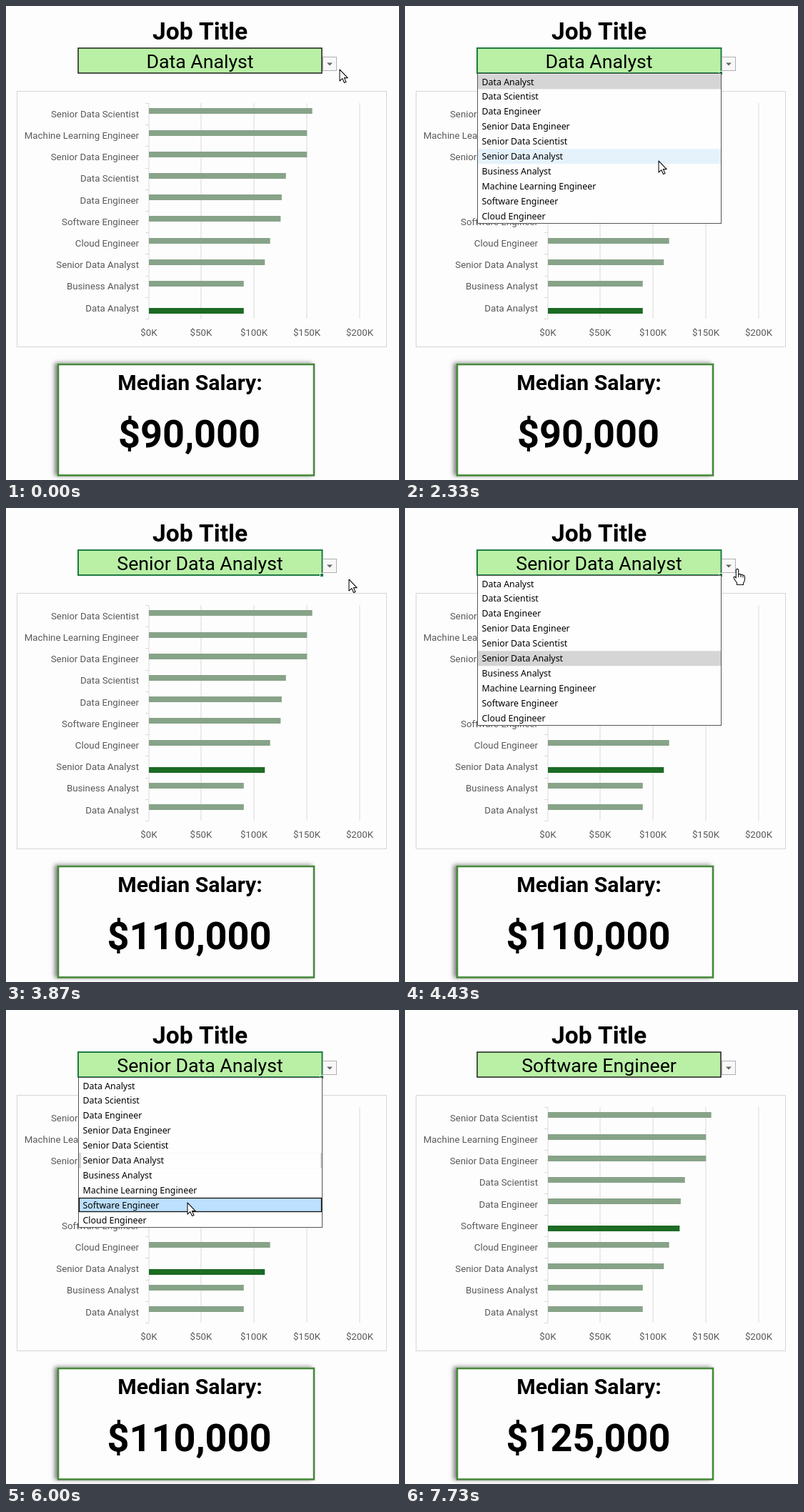
These frames come from a looping animation (550x664 px, 7760 ms). An HTML page with a canvas:

```html
<!DOCTYPE html>
<html lang="en">
<head>
<meta charset="utf-8">
<title>Job salary dashboard</title>
<style>
html, body { margin: 0; width: 100%; height: 100%; overflow: hidden; background: #fefdfe; }
canvas { display: block; }
</style>
</head>
<body>
<canvas id="stage" width="550" height="664"></canvas>
<script>
const ctx = document.getElementById('stage').getContext('2d');
const LOOP = 7760;
const SANS = 'Roboto, sans-serif';
const MENU_FONT = '12.4px "Noto Sans", sans-serif';

// Job title and median salary in thousands, top to bottom in the chart
const JOBS = [
  ['Senior Data Scientist', 155], ['Machine Learning Engineer', 150],
  ['Senior Data Engineer', 150], ['Data Scientist', 130],
  ['Data Engineer', 126], ['Software Engineer', 125],
  ['Cloud Engineer', 115], ['Senior Data Analyst', 110],
  ['Business Analyst', 90], ['Data Analyst', 90]
];
const MENU = [9, 3, 4, 2, 0, 7, 8, 1, 5, 6].map(i => JOBS[i][0]);
const MENU_TOP = 95.5, MENU_ROW = 20.95;

// Pointer stops: time, x, y
const POINTER = [
  [0, 467, 89], [300, 476, 101], [650, 470, 96], [1030, 457, 80],
  [1710, 457, 80], [1770, 452, 86], [2210, 452, 86], [2330, 355, 217],
  [2600, 350, 214], [2930, 352, 212], [3100, 459, 161], [3400, 505, 130],
  [3730, 480, 100], [3870, 480, 100], [4150, 464, 84], [4430, 465, 85],
  [4800, 430, 160], [5430, 275, 290], [5900, 254, 270], [6100, 254, 270],
  [7030, 400, 200]
];

const within = (t, a, b) => t >= a && t < b;
const ramp = (t, a, b) => Math.min(1, Math.max(0, (t - a) / (b - a)));
const ease = p => p * p * (3 - 2 * p);

function pointerAt(t) {
  const next = POINTER.findIndex(stop => stop[0] > t);
  if (next < 0) return POINTER[POINTER.length - 1].slice(1);
  const [t0, x0, y0] = POINTER[next - 1], [t1, x1, y1] = POINTER[next];
  const p = ease(ramp(t, t0, t1));
  return [x0 + (x1 - x0) * p, y0 + (y1 - y0) * p];
}

function box(x, y, w, h, fill, stroke, width = 1) {
  if (fill) { ctx.fillStyle = fill; ctx.fillRect(x, y, w, h); }
  if (stroke) {
    ctx.strokeStyle = stroke;
    ctx.lineWidth = width;
    ctx.strokeRect(x, y, w, h);
  }
}

function text(str, x, y, font, align = 'center', color = '#000') {
  ctx.font = font;
  ctx.textAlign = align;
  ctx.fillStyle = color;
  ctx.fillText(str, x, y);
}

function drawCell(title, selected) {
  text('Job Title', 271.5, 47, `bold 33.6px ${SANS}`);
  box(101, 59, 341, 35, '#b9f0a5');
  text(title, 271.5, 86.5, `26.7px ${SANS}`);
  ctx.globalAlpha = 1 - selected;
  box(101, 59, 341, 35, null, '#111', 1.4);
  ctx.globalAlpha = selected;
  box(101, 59, 341.5, 35, null, '#1f7a45', 2);
  box(439.5, 91.5, 5, 5, '#1f7a45', '#fefdfe');
  ctx.globalAlpha = 1;

  box(443.5, 71.5, 19, 19, '#f8f8f8', '#b0b0b0');
  ctx.fillStyle = '#666';
  ctx.fill(new Path2D('M449 79.5h8l-4 4z'));
}

function drawChart(current) {
  box(15.5, 119.5, 517, 358, null, '#d6d6d6');
  for (let i = 0; i <= 4; i++) {
    const x = Math.round(199.5 + i * 73.75);
    box(x - 0.5, 136, 1, 302, '#d9d9d9');
    text(`$${i ? i * 50 : 0}K`, x, 461.5, `13.3px ${SANS}`, 'center', '#595959');
  }
  for (let i = 0; i <= 10; i++) box(195, Math.round(136 + i * 30.2), 5, 1, '#d9d9d9');
  JOBS.forEach(([name, salary], i) => {
    const middle = 151.3 + i * 30.2, active = name === current;
    text(name, 186, middle + 4.5, `13.3px ${SANS}`, 'right', '#595959');
    box(200, Math.round(middle - (active ? 0 : 8)), salary * 1.475, 8,
        active ? '#1c6b24' : '#87a388');
  });
}

function drawSalary(current) {
  const salary = JOBS.find(job => job[0] === current)[1];
  ctx.save();
  ctx.shadowColor = 'rgba(0,0,0,.5)';
  ctx.shadowBlur = 6;
  ctx.shadowOffsetX = -4;
  ctx.shadowOffsetY = -1;
  box(72, 500.5, 360, 158, '#fefdfe');
  ctx.restore();
  box(73, 502, 358, 155.5, '#fefdfe', '#46893a', 2.6);
  text('Median Salary:', 257.5, 538, `bold 30.2px ${SANS}`);
  text(`$${salary},000`, 256.5, 618, `bold 54px ${SANS}`);
}

function drawMenu(current, hover, pressed) {
  box(101.5, 94.5, 341, 210, '#fefefe', '#555');
  MENU.forEach((name, i) => {
    const y = MENU_TOP + i * MENU_ROW;
    if (name === current) {
      box(102, y, 340, MENU_ROW, '#d6d5d6');
      if (pressed) box(105, y, 335, MENU_ROW, '#fefefe');
    } else if (i === hover) {
      if (pressed) box(102.5, Math.round(y) + 0.5, 339, 19, '#bce0fd', '#111', 1.3);
      else box(102, y, 340, MENU_ROW, '#e5f2fc');
    }
    text(name, 107.5, y + 15, MENU_FONT, 'left');
  });
}

const ARROW = new Path2D('M0 0V16L3.8 12.6L6.5 18.6L9 17.5L6.4 11.6H11.2Z');
const HAND = new Path2D('M-1.7 1.5Q0 -.8 1.7 1.5V8Q3.6 6.5 5 8.6Q6.8 7.3 8 9.4Q10.5 8.7 10.5 11.5' +
  'V15Q10.5 18 8.5 20V22.5H-.5V20L-4.7 13.5Q-5.6 11.2 -3.5 11.2L-1.7 13Z');
const FINGERS = new Path2D('M1.7 8V12M5 9V12M8 10V12.5');

function drawPointer(x, y, hand, alpha) {
  ctx.save();
  ctx.globalAlpha = alpha;
  ctx.translate(x, y);
  ctx.fillStyle = '#fff';
  ctx.strokeStyle = '#111';
  ctx.lineWidth = 1.1;
  ctx.lineJoin = 'round';
  const shape = hand ? HAND : ARROW;
  ctx.fill(shape);
  ctx.stroke(shape);
  if (hand) ctx.stroke(FINGERS);
  ctx.restore();
}

function draw(t) {
  const choice = (first, second) =>
    t < first ? 'Data Analyst' : t < second ? 'Senior Data Analyst' : 'Software Engineer';
  const title = choice(2970, 6070), shown = choice(3200, 6270);
  const [x, y] = pointerAt(t);
  const hand = within(t, 950, 2220) || within(t, 4050, 4560);
  const selected = ramp(t, 400, 900) * (1 - ramp(t, 7040, 7730));

  box(0, 0, 550, 664, '#fefdfe');
  drawChart(shown);
  drawSalary(shown);
  drawCell(title, selected);
  if (within(t, 1970, 2970) || within(t, 4300, 6070)) {
    const hover = hand || x > 442 ? -1 : Math.floor((y - MENU_TOP) / MENU_ROW);
    drawMenu(title, hover, within(t, 5950, 6070));
  }
  drawPointer(x, y, hand, 1 - ramp(t, 6700, 7030));
}

const start = performance.now();
function tick() {
  draw((performance.now() - start) % LOOP);
  requestAnimationFrame(tick);
}
tick();
</script>
</body>
</html>
```
